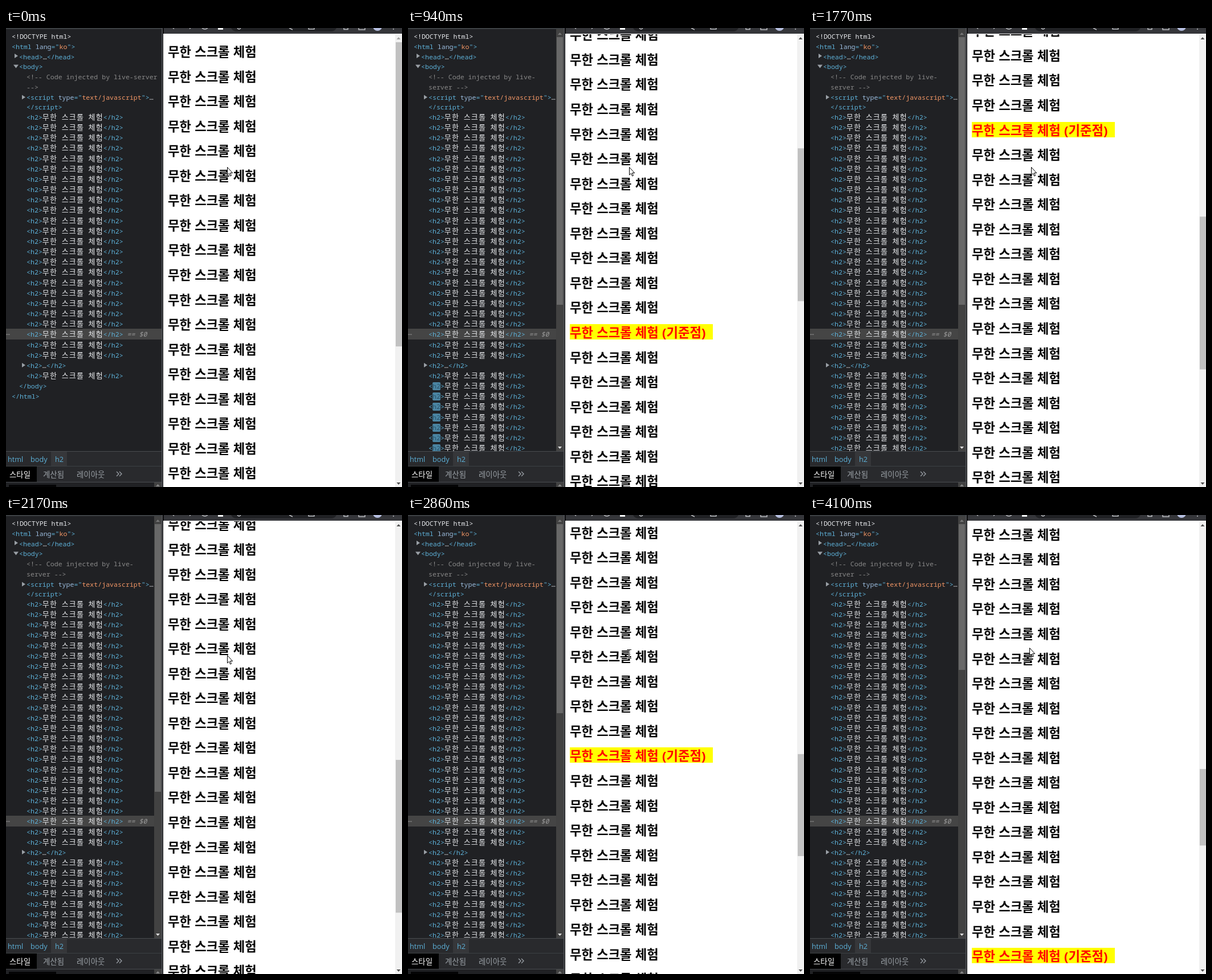
These frames come from a looping animation (695 by 806 pixels, 4.3 s). An HTML page:

```html
<!DOCTYPE html>
<html lang="ko">
<head>
<meta charset="utf-8">
<title>무한 스크롤</title>
<style>
html, body { margin: 0; width: 100%; height: 100%; overflow: hidden; background: #202124; }
#stage { position: absolute; left: 0; top: 0; width: 695px; height: 806px; overflow: hidden; background: #202124; }
#stage div, svg { position: absolute; }
#tree { left: 0; top: 2px; width: 273px; height: 741px; overflow: hidden; }
.line { white-space: pre; line-height: 18px; height: 18px; color: #5db0d7;
  font: 500 11.6px/18px "Noto Sans Mono", "DejaVu Sans Mono", monospace; }
.ko { font: 300 13px/1px "Noto Sans CJK KR", "Noto Sans CJK", sans-serif; letter-spacing: 1.15px; word-spacing: 2.8px; }
.ko, .txt { color: #e8eaed; }
.note { color: #898989; }
.name { color: #9bbbdc; }
.val { color: #f29766; }
.dollar { color: #9a9a9a; font-style: italic; }
.tag { display: inline-block; line-height: 14px; border-radius: 2px; }
#picked { left: 0; top: 526px; height: 19px; background: #454545; }
.crumb { color: #5db0d7; font: 12.7px/24px "Open Sans", "Noto Sans", sans-serif; top: 745px; }
.tab { color: #9aa0a6; font: 13.4px/28px "Noto Sans CJK KR", "Noto Sans CJK", sans-serif; top: 769px; white-space: pre; }
#page { left: 276px; top: 10px; width: 418px; height: 795px; overflow: hidden; background: #fff;
  border: solid #fff; border-width: 1px 0 0 1px; }
.row { left: 7px; top: 0; width: 251px; height: 27px; white-space: pre; color: #000;
  font: bold 22.25px/27px "Noto Sans CJK KR", "Noto Sans CJK", sans-serif; }
.row.mark { background: #ff0; color: #f00; }
.row i { font: bold 22px/1px "Open Sans", sans-serif; }
</style>
</head>
<body>
<div id="stage">
  <div id="tree"><div id="picked"></div></div>
  <svg id="panel" width="277" height="806" viewBox="0 0 277 806">
    <rect width="275" height="2" fill="#3c4043"/>
    <g fill="#9aa0a6">
      <path d="M15 45l6 4-6 4zM28 117.500l6 4-6 4zM28 588l6 4-6 4z"/>
      <path d="M13 64.500h9l-4.500 6z"/>
    </g>
    <g id="bar">
      <rect x="260" y="2" width="13" height="741" fill="#424242"/>
      <rect id="barThumb" x="261" y="16" width="11" height="470" fill="#686868"/>
      <path d="M263 12l3.500-4 3.500 4z" fill="#777"/>
      <path d="M263 735l3.500 4 3.500-4z" fill="#e0e0e0"/>
    </g>
    <rect y="743" width="273" height="63" fill="#292a2d"/>
    <rect y="743" width="273" height="1" fill="#494c50"/>
    <rect x="79" y="744" width="28" height="25" fill="#36373a"/>
    <rect y="769" width="273" height="1" fill="#3c4043"/>
    <rect y="770" width="54" height="27" fill="#000"/>
    <rect y="797" width="273" height="1" fill="#494c50"/>
    <rect y="798" width="260" height="8" fill="#202124"/>
    <rect x="5" y="802" width="83" height="4" fill="#050506"/>
    <rect x="260" y="798" width="13" height="8" fill="#424242"/>
    <path d="M263 805l3.500-4 3.500 4z" fill="#888"/>
    <rect x="273" width="2" height="806" fill="#4a4c50"/>
    <rect x="275" width="2" height="806" fill="#0b0b0c"/>
  </svg>
  <div class="crumb" style="left:3px">html</div>
  <div class="crumb" style="left:43px">body</div>
  <div class="crumb" style="left:86px">h2</div>
  <div class="tab" style="left:6px;color:#fff">스타일</div>
  <div class="tab" style="left:65px">계산됨</div>
  <div class="tab" style="left:124px">레이아웃</div>
  <svg width="14" height="14" style="left:192px;top:776px"><path d="M2 3l4 4-4 4M7 3l4 4-4 4" fill="none" stroke="#9aa0a6" stroke-width="1.300"/></svg>
  <div id="page"></div>
  <svg width="418" height="10" style="left:277px;top:0">
    <rect width="418" height="10" fill="#35363a"/>
    <path d="M118 0h185q-3 6-10 6H128q-7 0-10-6z" fill="#202124"/>
    <g fill="none" stroke="#bfc1c5" stroke-width="1.400">
      <path d="M16 0l2 1.500M45 1.500l2-1.500M67 0q5 4 10 0M129 0q3 4 6 0M220 0l6 3M254 0v2h10v-2M316 0v2.500h7v-2.500M342 0v3h11v-3M402 2h2"/>
    </g>
    <rect x="95" width="9" height="3" fill="#f1f3f4"/>
    <circle cx="375" cy="-3" r="8" fill="#b6bfe0"/>
  </svg>
  <svg width="12" height="795" style="left:683px;top:11px">
    <rect width="12" height="795" fill="#f1f1f1"/>
    <rect id="thumb" x="1" width="11" fill="#c1c1c1"/>
    <path id="up" d="M2.500 9l3.500-4 3.500 4z"/>
    <path d="M2.500 787l3.500 4 3.500-4z" fill="#505050"/>
  </svg>
  <svg id="arrow" width="16" height="22" style="left:0;top:0">
    <path d="M.500.500v13.500l3-2.700 2.100 4.700 2-.900-2.100-4.500h4.200z" fill="#fff" stroke="#000"/>
  </svg>
  <svg id="beam" width="10" height="18" style="left:0;top:0;mix-blend-mode:difference">
    <path d="M1 1.500h3l1 1 1-1h3M5 2v14M1 16.500h3l1-1 1 1h3" fill="none" stroke="#fff" stroke-width="1.200"/>
  </svg>
</div>
<script>
const LOOP = 4300, STEP = 43.55, BATCH = 25, FIRST = 41, VIEW = 795, TRACK = 768;
const TEXT = '무한 스크롤 체험';
const $ = id => document.getElementById(id);

// bursts of screen updates, 70 ms apart: [start, count]
const bursts = [[0, 1], [660, 5], [1000, 3], [1630, 4], [1900, 3], [2100, 6], [2720, 6], [3270, 3], [3540, 9]];
// wheel motion: [time, scroll offset]
const wheel = [
  [0, 0], [590, 0], [660, 24], [730, 150], [800, 320], [870, 450], [940, 552.2], [1000, 618], [1140, 690],
  [1560, 690], [1630, 715], [1770, 907.6], [1900, 1060], [2100, 1172], [2170, 1200.4], [2310, 1390], [2450, 1500],
  [2650, 1500], [2720, 1545], [2860, 1752.5], [3000, 1880], [3070, 1900],
  [3200, 1900], [3270, 1950], [3410, 2154.1], [3540, 2270], [3750, 2345], [3960, 2450], [4100, 2489.6]
];
// strength of the flash on freshly added nodes
const flash = [[0, 1], [1000, .9], [1140, .8], [1280, .4], [1350, .1], [1490, 0]];
// [time, shape, x, y]
const pointer = [[0, 'arrow', 388, 244], [2100, 'arrow', 388, 246], [2790, 'beam', 383, 235],
  [3340, 'beam', 381, 233], [3820, 'arrow', 385, 233]];

const esc = s => s.replace(/</g, '&lt;');
const span = (cls, s) => `<span class="${cls}">${esc(s)}</span>`;
const heading = esc('<') + span('tag', 'h2') + '>' + span('ko', TEXT) + esc('</h2>');

function line(i, x, html) {
  const mid = i < 8 ? 15 + 17.75 * i : 157 + 18.16 * (i - 8);
  const el = document.createElement('div');
  el.className = 'line';
  el.style.left = x + 'px';
  el.style.top = Math.round(mid - 11) + 'px';
  el.innerHTML = html;
  $('tree').append(el);
  return el;
}

line(0, 10, span('txt', '<!DOCTYPE html>'));
line(1, 10, esc('<html ') + span('name', 'lang') + '="' + span('val', 'ko') + '">');
line(2, 23, esc('<head>') + span('txt', '…') + esc('</head>'));
line(3, 23, esc('<body>'));
const note = [line(4, 36, ''), line(5, 36, '')];
note.forEach(el => el.classList.add('note'));
line(6, 36, esc('<script ') + span('name', 'type') + '="' + span('val', 'text/javascript') + '">' + span('txt', '…'));
line(7, 36, esc('<' + '/script>'));
for (let i = 8; i < 34; i++) {
  if (i === 32) line(i, 36, esc('<h2>') + span('txt', '…') + esc('</h2>'));
  else line(i, 36, heading + (i === 29 ? span('dollar', ' == $0') : ''));
}
line(29, 0, span('note', '⋯'));
const ends = [line(34, 23, esc('</body>')), line(35, 10, esc('</html>'))];
const added = Array.from({ length: 7 }, (_, k) => line(34 + k, 36, heading));
const tags = added.map(el => el.querySelector('.tag'));

const rows = Array.from({ length: 21 }, () => {
  const el = document.createElement('div');
  el.className = 'row';
  $('page').append(el);
  return el;
});

const last = (table, t) => table.filter(k => k[0] <= t).pop();

function tick(t) {
  const [start, count] = last(bursts, t);
  return start + 70 * Math.min(count - 1, Math.floor((t - start) / 70));
}

function offset(t) {
  const j = wheel.findIndex(k => k[0] > t);
  if (j < 0) return wheel[wheel.length - 1][1];
  const [t0, y0] = wheel[j - 1], [t1, y1] = wheel[j];
  return y0 + (y1 - y0) * (t - t0) / (t1 - t0);
}

const show = (el, on) => { el.style.display = on ? '' : 'none'; };

function drawPage(y, loads) {
  const first = Math.max(0, Math.floor((y - FIRST) / STEP));
  rows.forEach((el, k) => {
    const i = first + k, mark = i % BATCH === BATCH - 1;
    if (el.dataset.i !== String(i)) {
      el.dataset.i = i;
      el.className = mark ? 'row mark' : 'row';
      el.innerHTML = mark ? TEXT + ' <i>(</i>기준점<i>)</i>' : TEXT;
    }
    el.style.transform = `translateY(${Math.round(FIRST + STEP * i - y) - 25}px)`;
  });
  const scale = TRACK / (1143 + 1133 * loads);
  $('thumb').setAttribute('y', 14 + y * scale);
  $('thumb').setAttribute('height', VIEW * scale);
  $('up').setAttribute('fill', y > 0 ? '#505050' : '#a3a3a3');
}

function drawTree(t, loads) {
  const full = loads > 0;
  note[0].textContent = full ? '<!-- Code injected by live-' : '<!-- Code injected by live-server';
  note[1].textContent = full ? 'server -->' : '-->';
  ends.forEach(el => show(el, !full));
  added.forEach(el => show(el, full));
  show($('bar'), full);
  $('picked').style.width = (full ? 260 : 273) + 'px';
  $('barThumb').setAttribute('height', [0, 470, 332, 256][loads]);
  const a = last(flash, t)[1];
  tags.forEach(el => {
    el.style.background = `rgba(84,150,184,${a * .85})`;
    el.style.color = a > .3 ? '#28526a' : '';
  });
}

function drawPointer(t) {
  const [, shape, x, y] = last(pointer, t);
  show($('arrow'), shape === 'arrow');
  show($('beam'), shape === 'beam');
  $(shape).style.transform = `translate(${x}px,${y}px)`;
}

const born = performance.now();
function frame() {
  const t = (performance.now() - born) % LOOP;
  const y = offset(tick(t));
  // a batch loads whenever a marked row enters the view
  const lead = y + 806 - FIRST - (BATCH - 1) * STEP;
  const loads = Math.min(3, Math.max(0, Math.floor(lead / (BATCH * STEP)) + 1));
  drawPage(y, loads);
  drawTree(t, loads);
  drawPointer(t);
  requestAnimationFrame(frame);
}
frame();
</script>
</body>
</html>
```
